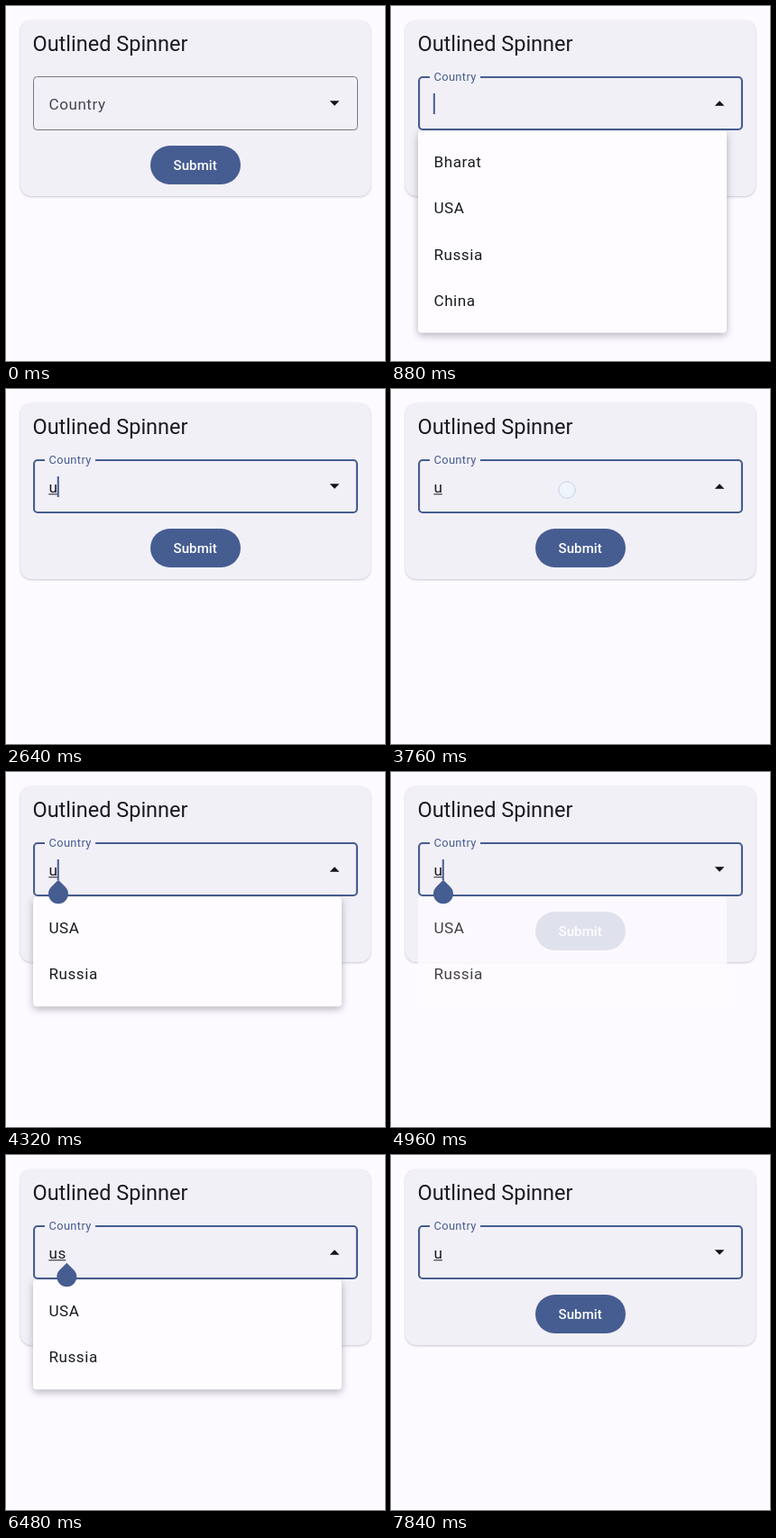
An HTML page with a canvas for the animation above (8 s loop, 420x394 px).

```html
<!DOCTYPE html>
<html lang="en">
<head>
<meta charset="utf-8">
<title>Outlined Spinner</title>
<style>
  html, body { margin: 0; width: 100%; height: 100%; overflow: hidden; background: #fdfbff; }
  canvas { display: block; width: 420px; height: 394px; }
</style>
</head>
<body>
<canvas id="stage"></canvas>
<script>
const W = 420, H = 394, LOOP = 8000, STEP = 80;
const BLUE = '#465d91', INK = '#1b1b1f', CARD = '#f2f0f7', PAGE = '#fdfbff';
const FONT = 'Roboto, "Noto Sans", sans-serif';
const BODY = 17.1, ROW = 51.3;

const canvas = document.getElementById('stage');
const ctx = canvas.getContext('2d');
const dpr = window.devicePixelRatio || 1;
canvas.width = W * dpr;
canvas.height = H * dpr;

// Timeline, in ms
const FOCUS = 480;
const typed = [[0, ''], [2240, 'u'], [5840, 'us'], [7280, 'u']];
const menus = [
  { open: 640, close: 2240, items: ['Bharat', 'USA', 'Russia', 'China'] },
  { open: 3800, close: 4920, items: ['USA', 'Russia'] },
  { open: 6160, close: 7280, items: ['USA', 'Russia'] }
];
const arrowUp = [[480, 2240], [3720, 4880], [6080, 7280]];
const caretOn = [[600, 1100], [1600, 2100], [2240, 2800], [3200, 3700], [3840, 4340],
                 [4840, 5340], [5600, 6340], [6720, 7200], [7280, 7780]];
const handleOn = [[3880, 5760], [6160, 7280]];
const touches = [[320, 560], [3600, 3800], [4720, 4880], [5920, 6120]];

const clamp = v => Math.max(0, Math.min(1, v));
const mix = (a, b, k) => a + (b - a) * k;
const within = (spans, t) => spans.some(([a, b]) => t >= a && t < b);

function text(str, x, y, size, color, spacing = 0, weight = 400) {
  ctx.font = `${weight} ${size}px ${FONT}`;
  ctx.letterSpacing = spacing + 'px';
  ctx.fillStyle = color;
  ctx.fillText(str, x, y);
  return ctx.measureText(str).width;
}

function box(x, y, w, h, r) {
  ctx.beginPath();
  ctx.roundRect(x, y, w, h, r);
}

function shadow(color, blur, dy) {
  ctx.shadowColor = color;
  ctx.shadowBlur = blur * dpr;
  ctx.shadowOffsetY = dy * dpr;
}

function drawCard() {
  ctx.save();
  shadow('rgba(40,40,60,.28)', 2.5, 0.8);
  ctx.fillStyle = CARD;
  box(16, 16, 388, 195, 12);
  ctx.fill();
  ctx.restore();
  text('Outlined Spinner', 29.5, 50, 23.5, INK);

  ctx.fillStyle = BLUE;
  box(160, 155, 100, 43, 21.5);
  ctx.fill();
  text('Submit', 185.5, 182, 15, '#fff', 0.1, 500);
}

function drawField(t) {
  const focused = t >= FOCUS;
  const lift = clamp((t - FOCUS) / 160);
  const line = focused ? 2.1 : 1;
  ctx.lineWidth = line;
  ctx.strokeStyle = focused ? BLUE : '#757780';
  box(30 + line / 2, 78 + line / 2, 360 - line, 60 - line, 4);
  ctx.stroke();
  if (focused) {
    ctx.fillStyle = CARD;
    ctx.fillRect(43, 76, 56, 5);
  }
  const size = mix(BODY, 12.8, lift);
  text('Country', 47.5, mix(115, 83.2, lift), size, focused ? BLUE : '#45464f', size * 0.031);

  const up = within(arrowUp, t) ? -1 : 1;
  ctx.fillStyle = '#111114';
  ctx.beginPath();
  ctx.moveTo(358.8, 108 - 2.7 * up);
  ctx.lineTo(369.4, 108 - 2.7 * up);
  ctx.lineTo(364.1, 108 + 2.7 * up);
  ctx.fill();
}

function drawInput(t) {
  const value = typed.filter(([at]) => t >= at).pop()[1];
  const width = value ? text(value, 47.5, 115, BODY, INK, 0.53) : 0;
  if (value) {
    ctx.fillStyle = '#303036';
    ctx.fillRect(47.3, 116.2, width - 0.4, 1.1);
  }
  const x = 47.6 + width;
  if (within(caretOn, t)) {
    ctx.fillStyle = BLUE;
    ctx.fillRect(x - 0.8, 97, 2, 23);
  }
  return x + 0.4;
}

function drawMenu({ open, close, items }, t) {
  const alpha = clamp((t - open) / 200) * clamp(1 - (t - close) / 240);
  if (!alpha) return;
  const height = 16.4 + items.length * ROW;
  ctx.save();
  ctx.globalAlpha = alpha;
  if (t <= close) shadow('rgba(40,40,60,.34)', 9, 3);
  ctx.fillStyle = '#fefcff';
  box(30, 138.6, 342, height + 2.6, 4);
  ctx.fill();
  shadow('transparent', 0, 0);
  items.forEach((name, i) => text(name, 47.5, 179 + i * ROW, BODY, INK, 0.53));
  ctx.restore();
}

// Teardrop below the caret: a disc with one square corner pointing up
function drawHandle(x) {
  ctx.save();
  ctx.translate(x, 135.2);
  ctx.rotate(Math.PI / 4);
  ctx.fillStyle = BLUE;
  box(-11, -11, 22, 22, [0, 11, 11, 11]);
  ctx.fill();
  ctx.restore();
}

function drawTouch() {
  ctx.beginPath();
  ctx.arc(195, 112, 9.2, 0, Math.PI * 2);
  ctx.fillStyle = 'rgba(240,245,252,.7)';
  ctx.fill();
  ctx.lineWidth = 1;
  ctx.strokeStyle = '#c3d3e8';
  ctx.stroke();
}

function draw(t) {
  ctx.setTransform(dpr, 0, 0, dpr, 0, 0);
  ctx.fillStyle = PAGE;
  ctx.fillRect(0, 0, W, H);
  drawCard();
  drawField(t);
  const x = drawInput(t);
  menus.forEach(m => drawMenu(m, t));
  if (within(handleOn, t)) drawHandle(x);
  if (within(touches, t)) drawTouch();
}

const start = performance.now();
function tick() {
  const t = (performance.now() - start) % LOOP;
  draw(Math.floor(t / STEP) * STEP);
  requestAnimationFrame(tick);
}
tick();
</script>
</body>
</html>
```
